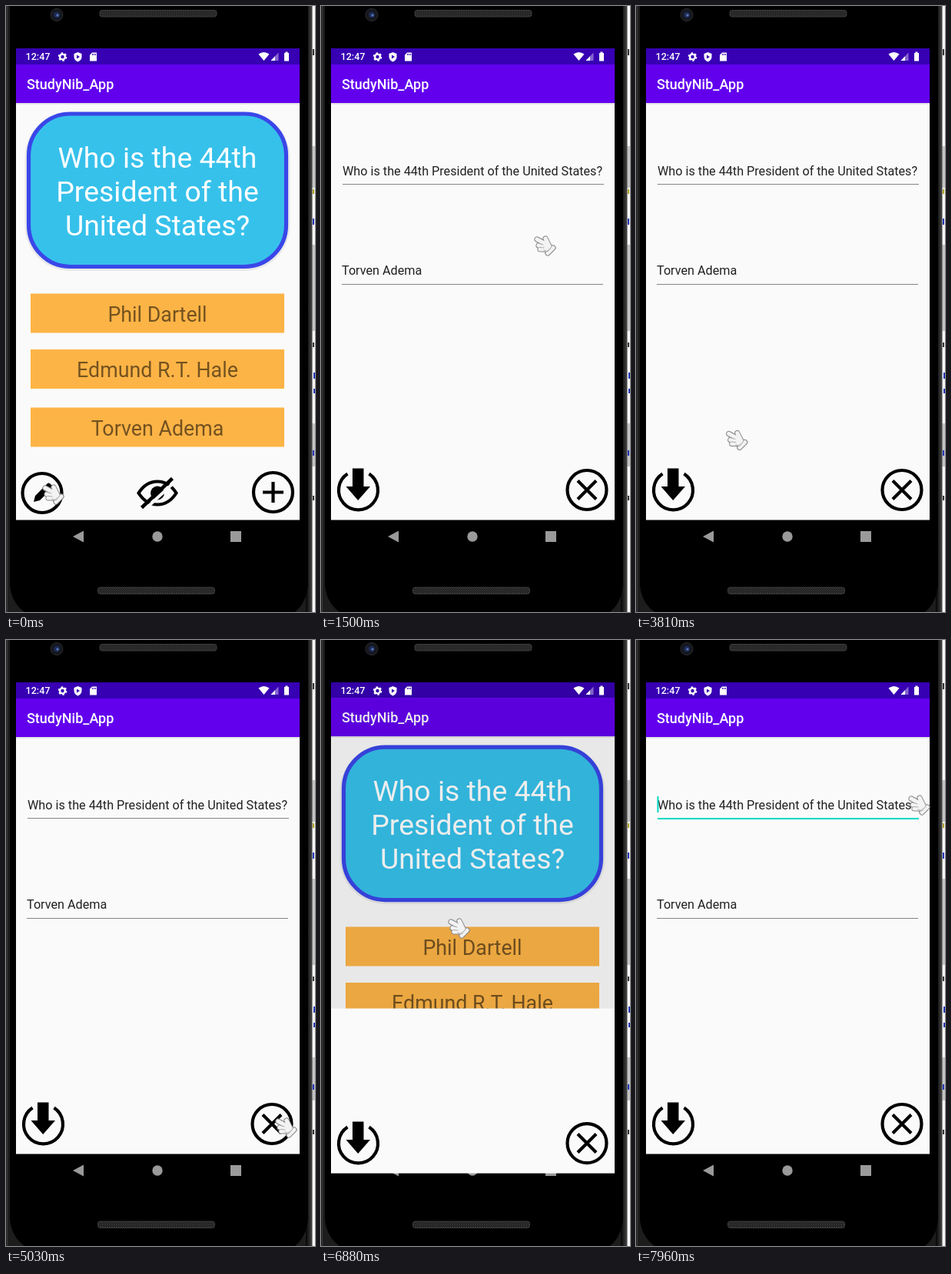
These frames come from a looping animation (402 by 787 pixels, 8000 ms). An HTML page:

```html
<!DOCTYPE html>
<html lang="en">
<head>
<meta charset="utf-8">
<title>Flash cards</title>
<style>
  html, body { margin: 0; width: 100%; height: 100%; overflow: hidden; background: #000; }
  svg { display: block; width: 100vw; height: 100vh; }
  text { font-family: Roboto, sans-serif; }
  .title { font-size: 18px; font-weight: 500; fill: #fff; }
  .card { font-size: 37.4px; fill: #fff; text-anchor: middle; }
  .answer { font-size: 26.8px; fill: #000; fill-opacity: .54; text-anchor: middle; }
  .field { font-size: 16.2px; fill: #212121; }
  .icon { fill: none; stroke: #000; stroke-width: 4.2; }
  .rule { stroke: #858585; }
  .focus { stroke: #03dac5; stroke-width: 2; }
</style>
</head>
<body>
<svg viewBox="0 0 402 787">
  <defs>
    <clipPath id="screen"><rect x="13" y="55" width="369" height="640"/></clipPath>
    <clipPath id="reveal"><rect id="cut" x="13" y="55" width="369" height="732"/></clipPath>
    <linearGradient id="edge">
      <stop offset="0" stop-color="#050505"/><stop offset=".6" stop-color="#2b2b2b"/><stop offset="1" stop-color="#4a4a4a"/>
    </linearGradient>
    <pattern id="mesh" width="3" height="3" patternUnits="userSpaceOnUse">
      <rect width="3" height="3" fill="#1c1c1c"/><path d="M0 0L3 3M3 0L0 3" stroke="#3c3c3c" stroke-width=".7"/>
    </pattern>
    <g id="bars">
      <rect x="13" y="55" width="369" height="612.5" fill="#fafafa"/>
      <rect x="13" y="126" width="369" height="2" fill="#000" fill-opacity=".08"/>
      <rect x="13" y="55" width="369" height="21.5" fill="#3700b3"/>
      <rect x="13" y="76" width="369" height="50" fill="#6200ee"/>
      <text class="title" x="27" y="108">StudyNib_App</text>
    </g>
    <g id="fist" fill="none">
      <path d="M-9-7L2-1M2-8L6 0M-7 1L1 3M-5 6L2 6"/>
      <path d="M0-1L7 2 2 6Z"/>
      <path d="M5 11L12 4"/>
    </g>
  </defs>

  <!-- desktop strip and phone body -->
  <rect x="390" width="12" height="787" fill="#f6f6f6"/>
  <path d="M400 182v54M400 310v112M400 542v56" stroke="#c4c4c4" stroke-width="4"/>
  <path d="M400 56v8M400 437v6M400 636v6" stroke="#333" stroke-width="2"/>
  <path d="M400 276v8M401 476v8M401 497v6M400 577v7" stroke="#2438b8" stroke-width="2"/>
  <path d="M400 238v6" stroke="#b5a52a" stroke-width="2"/>
  <rect width="398" height="787" fill="#1d1d1d"/>
  <rect x="390" width="8.5" height="787" fill="url(#edge)"/>
  <path d="M1.5 0V787" stroke="#3a3a3a" stroke-width="1.5"/>
  <path d="M5 0H393V752Q391 775 376 787H24Q7 775 5 752Z" fill="#000"/>
  <circle cx="66" cy="11.5" r="8" fill="#15171d" stroke="#2c2c30"/>
  <circle cx="66" cy="11.5" r="4" fill="#1c2a52"/>
  <circle cx="67" cy="12" r="1.7" fill="#5674b4"/>
  <g fill="url(#mesh)" stroke="#3d3d3d">
    <rect x="122" y="5.500" width="152" height="8.500" rx="3"/>
    <rect x="119.500" y="755" width="152" height="8.500" rx="3"/>
  </g>
  <g fill="#9a9a9a">
    <path d="M87 689L101 681.5V696.5Z"/>
    <circle cx="197" cy="689" r="6.7"/>
    <rect x="292" y="682" width="14" height="14"/>
  </g>

  <g id="stage">
    <g id="main"><g>
      <use href="#bars"/>
      <rect x="24.500" y="138" width="345" height="206" rx="59" fill="#000" fill-opacity=".07"/>
      <rect x="29.500" y="140" width="335" height="198.500" rx="54" fill="#36c1eb" stroke="#3a46e8" stroke-width="5.200"/>
      <text class="card" x="197" y="210">Who is the 44th</text>
      <text class="card" x="197" y="254">President of the</text>
      <text class="card" x="197" y="298">United States?</text>
      <path d="M32 373.5h330v51H32zM32 446h330v51H32zM32 521.5h330v51H32z" fill="#fdb446"/>
      <text class="answer" x="197" y="410">Phil Dartell</text>
      <text class="answer" x="197" y="482">Edmund R.T. Hale</text>
      <text class="answer" x="197" y="557.5">Torven Adema</text>
      <circle class="icon" cx="47" cy="632.5" r="25.5"/>
      <path d="M36 644l2-8 12-12 6 6-12 12zM51.5 622.5l2.5-2.5q1.5-1 3 0l3 3q1 1.5 0 3l-2.5 2.5z"/>
      <path class="icon" d="M172.5 632.5Q182 617.5 197 617.5T221.5 632.5Q212 647.5 197 647.5T172.5 632.5Z"/>
      <circle cx="197" cy="632.5" r="9"/>
      <path d="M180 654.5L220.5 617" stroke="#fafafa" stroke-width="4"/>
      <path d="M176.5 651.5L216.5 613.5" stroke="#000" stroke-width="4.5"/>
      <circle class="icon" cx="347.5" cy="631.5" r="25.5"/>
      <path class="icon" d="M334 631.5h27M347.5 618v27"/>
    </g></g>

    <rect id="dim" x="13" y="55" width="369" height="612.5"/>

    <g id="edit"><g>
      <use href="#bars"/>
      <text class="field" x="28" y="219.5">Who is the 44th President of the United States?</text>
      <text class="field" x="27" y="349">Torven Adema</text>
      <path class="rule" d="M28 231.5H368M27 361.5H367"/>
      <path class="focus" id="focus" d="M28 232H368M28.5 203V224"/>
      <path class="icon" d="M34.5 607.5A25.5 25.5 0 1 0 62.5 607.5"/>
      <path d="M41 600.5H55.5V624H64L48.2 642 32.5 624H41Z"/>
      <circle class="icon" cx="346" cy="628.5" r="25.5"/>
      <path class="icon" d="M334 616.5l24 24M358 616.5l-24 24"/>
    </g></g>
  </g>

  <g fill="#fff">
    <text x="25.5" y="70.3" font-size="12.6" font-weight="500">12:47</text>
    <circle cx="73.5" cy="66" r="3.4" fill="none" stroke="#fff" stroke-width="2.4"/>
    <circle cx="73.5" cy="66" r="4.9" fill="none" stroke="#fff" stroke-width="1.8" stroke-dasharray="2.56"/>
    <path d="M93.5 60l5 2v4q0 4-5 6.5-5-2.5-5-6.5v-4z"/>
    <path d="M92 63.5l4 2.5-4 2.5z" fill="#3700b3"/>
    <path d="M109 63.5l3-3h6v11h-9z"/>
    <path d="M112.5 62v2M114.5 62v2M116.5 62v2" stroke="#3700b3"/>
    <path d="M328.5 62.5Q335.5 57.5 342.5 62.5L335.5 71Z"/>
    <path d="M344.5 71L354.5 60.5V71Z" fill-opacity=".4"/>
    <path d="M344.5 71L350 65.3V71Z"/>
    <path d="M362 61h1.5v-1.5h3V61h1.5v10.5h-6z"/>
  </g>

  <g id="hand" stroke-linecap="round" stroke-linejoin="round">
    <use href="#fist" stroke="#858585" stroke-width="7.2"/>
    <use href="#fist" stroke="#f3f3f3" stroke-width="5.2"/>
    <path d="M-7-2L-1 0M-6 3.500L0 4M0 7L5 9 10 3" fill="none" stroke="#999" stroke-width=".8"/>
  </g>
</svg>
<script>
const LOOP = 8000, STEP = 130, PHASE = 100;
const SLIDE = 27, LIFT = 13, TOP = 55, HEIGHT = 613, SETTLE = 650, FOCUS = 7810;
const $ = id => document.getElementById(id);

// When each page opens over the other
const opens = [[-LOOP, "main"], [455, "edit"], [5566, "main"], [6830, "edit"]];

// Pointer moves: start, end, x, y
const moves = [[0, 1, 60, 633], [650, 1190, 290, 310], [1500, 2200, 379, 224],
  [3270, 4050, 83, 626], [4450, 4900, 363, 632], [5560, 5950, 106, 612],
  [5950, 6240, 60, 633], [6640, 6860, 178, 373], [6860, 7900, 367, 213]];

function pointer(t) {
  let x = 60, y = 633;
  for (const [a, b, toX, toY] of moves) {
    const f = Math.min(1, Math.max(0, (t - a) / (b - a)));
    const e = f * (2 - f);
    x += (toX - x) * e;
    y += (toY - y) * e;
  }
  return [x, y];
}

function place(page, dy, clip) {
  page.setAttribute("clip-path", `url(#${clip})`);
  page.firstElementChild.setAttribute("transform", `translate(0 ${dy})`);
}

// The new page slides up and is uncovered from below; the old one lifts and darkens.
function showPages(t) {
  const [start, name] = opens.findLast(o => o[0] <= t);
  const next = $(name), old = $(name === "main" ? "edit" : "main"), dim = $("dim");
  const u = t - start, moving = u < SETTLE;
  const p = moving ? 1 - 1 / (1 + (u / 101) ** 2.13) : 1;
  const hidden = (1 - p ** .52) ** 1.49;
  const dy = SLIDE * (1 - p);
  if ($("stage").lastElementChild !== next) $("stage").append(old, dim, next);
  place(old, -LIFT * p, "screen");
  place(next, dy, "reveal");
  $("cut").setAttribute("y", TOP + dy + HEIGHT * hidden);
  dim.setAttribute("fill-opacity", .1 * p ** .13);
  next.style.display = "";
  old.style.display = dim.style.display = moving ? "" : "none";
}

function draw() {
  const time = performance.now() % LOOP;
  // The screen refreshes in steps.
  const t = Math.max(0, Math.floor((time - PHASE) / STEP) * STEP + PHASE);
  showPages(t);
  $("focus").style.display = time >= FOCUS ? "" : "none";
  $("hand").setAttribute("transform", `translate(${pointer(t)})`);
  requestAnimationFrame(draw);
}
draw();
</script>
</body>
</html>
```
